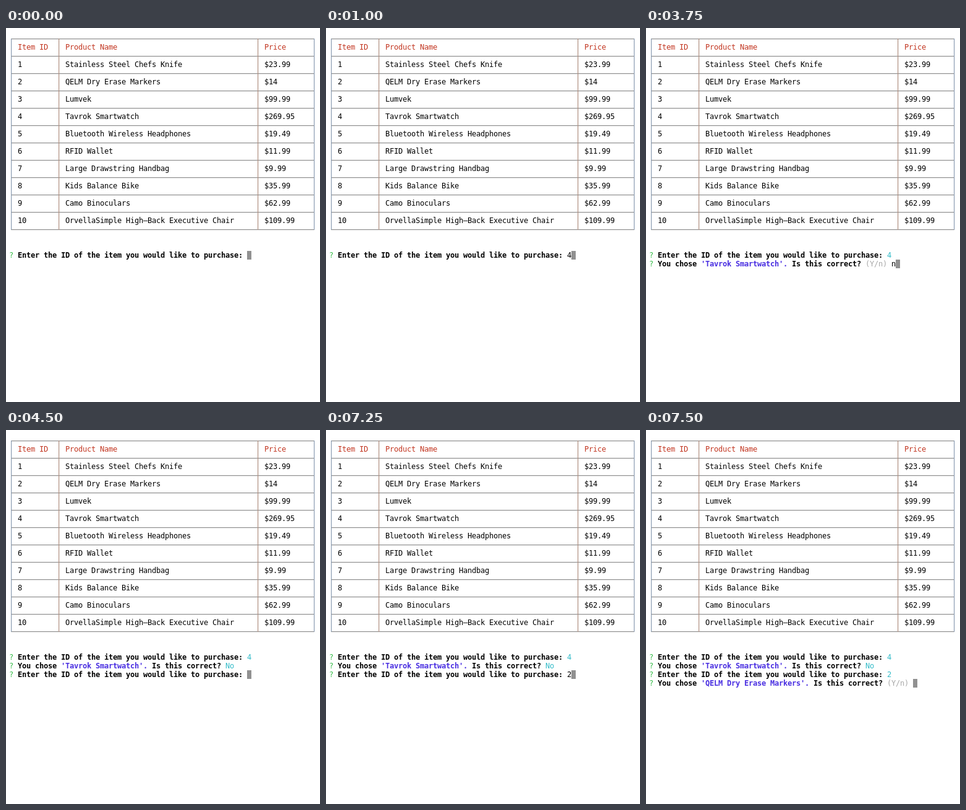
An HTML page that plays this animation: 508 by 604 pixels, repeating every 8000 ms.

```html
<!DOCTYPE html>
<html lang="en">
<head>
<meta charset="utf-8">
<title>Terminal shop</title>
<style>
html, body { margin: 0; width: 100%; height: 100%; overflow: hidden; background: #fff; }
svg { display: block; width: 508px; height: 604px; }
text { font: 12px "DejaVu Sans Mono", monospace; fill: #000; white-space: pre; }
.bold { font-weight: bold; }
.red { fill: #c23621; }
.green { fill: #39bd4b; }
.cyan { fill: #33bbc8; }
.blue { fill: #492ee1; font-weight: bold; }
.dim { fill: #a8a8a8; }
</style>
</head>
<body>
<svg id="stage" viewBox="0 0 508 604"><g id="table"></g><g id="prompt"></g></svg>
<script>
const LEFT = 5, CELL = 7, LINE = 14, LOOP = 8000;
const ITEMS = [
  ["Item ID", "Product Name", "Price"],
  ["1", "Stainless Steel Chefs Knife", "$23.99"],
  ["2", "QELM Dry Erase Markers", "$14"],
  ["3", "Lumvek", "$99.99"],
  ["4", "Tavrok Smartwatch", "$269.95"],
  ["5", "Bluetooth Wireless Headphones", "$19.49"],
  ["6", "RFID Wallet", "$11.99"],
  ["7", "Large Drawstring Handbag", "$9.99"],
  ["8", "Kids Balance Bike", "$35.99"],
  ["9", "Camo Binoculars", "$62.99"],
  ["10", "OrvellaSimple High–Back Executive Chair", "$109.99"]
];
const table = document.getElementById("table");
const prompt = document.getElementById("prompt");

function add(parent, tag, attrs, content = "") {
  const el = document.createElementNS("http://www.w3.org/2000/svg", tag);
  for (const key in attrs) el.setAttribute(key, attrs[key]);
  el.textContent = content;
  parent.append(el);
}

// Text sits on the terminal's character grid.
function write(parent, col, top, content, style) {
  const x = [...content].map((c, i) => LEFT + CELL * (col + i)).join(" ");
  add(parent, "text", { x, y: top + 11, class: style }, content);
}

function drawTable() {
  for (let i = 0; i <= ITEMS.length; i++)
    add(table, "rect", { x: 8, y: 17 + 28 * i, width: 491, height: 1.2, fill: "#8f8f8f" });
  for (const [x, fill] of [[8, "#8c9cb2"], [85, "#b08f80"], [407, "#b08f80"], [498, "#8c9cb2"]])
    add(table, "rect", { x, y: 17, width: 1.2, height: 309, fill });
  ITEMS.forEach((row, i) => row.forEach((cell, j) =>
    write(table, [2, 13, 59][j], 24 + 28 * i, cell, i ? "" : "red")));
}

const ask = (...answer) =>
  [["?", "green"], [" Enter the ID of the item you would like to purchase: ", "bold"], ...answer];
const confirm = (id, ...answer) =>
  [["?", "green"], [" You chose ", "bold"], [`'${ITEMS[id][1]}'.`, "blue"],
   [" Is this correct? ", "bold"], ...answer];

const hint = ["(Y/n) ", "dim"];
const four = ask(["4", "cyan"]);
const refused = [four, confirm(4, ["No", "cyan"])];

// Start time and prompt lines; the cursor ends the last line.
const STEPS = [
  [0, [ask()]],
  [1000, [ask(["4", ""])]],
  [1750, [four, confirm(4, hint)]],
  [3750, [four, confirm(4, hint, ["n", ""])]],
  [4500, [...refused, ask()]],
  [6500, [...refused, ask(["2", ""])]],
  [7500, [...refused, ask(["2", "cyan"]), confirm(2, hint)]]
];

function drawPrompt(lines) {
  prompt.replaceChildren();
  let col, top;
  lines.forEach((line, i) => {
    col = 0;
    top = 360 + LINE * i;
    for (const [content, style] of line) {
      write(prompt, col, top, content, style);
      col += content.length;
    }
  });
  add(prompt, "rect", { x: LEFT + CELL * col, y: top, width: CELL, height: LINE, fill: "#919191" });
}

let shown;
const start = performance.now();
function frame(now) {
  const t = Math.max(0, now - start) % LOOP;
  const step = STEPS.findLast(([from]) => t >= from);
  if (step !== shown) drawPrompt((shown = step)[1]);
  requestAnimationFrame(frame);
}

drawTable();
frame(start);
</script>
</body>
</html>
```
